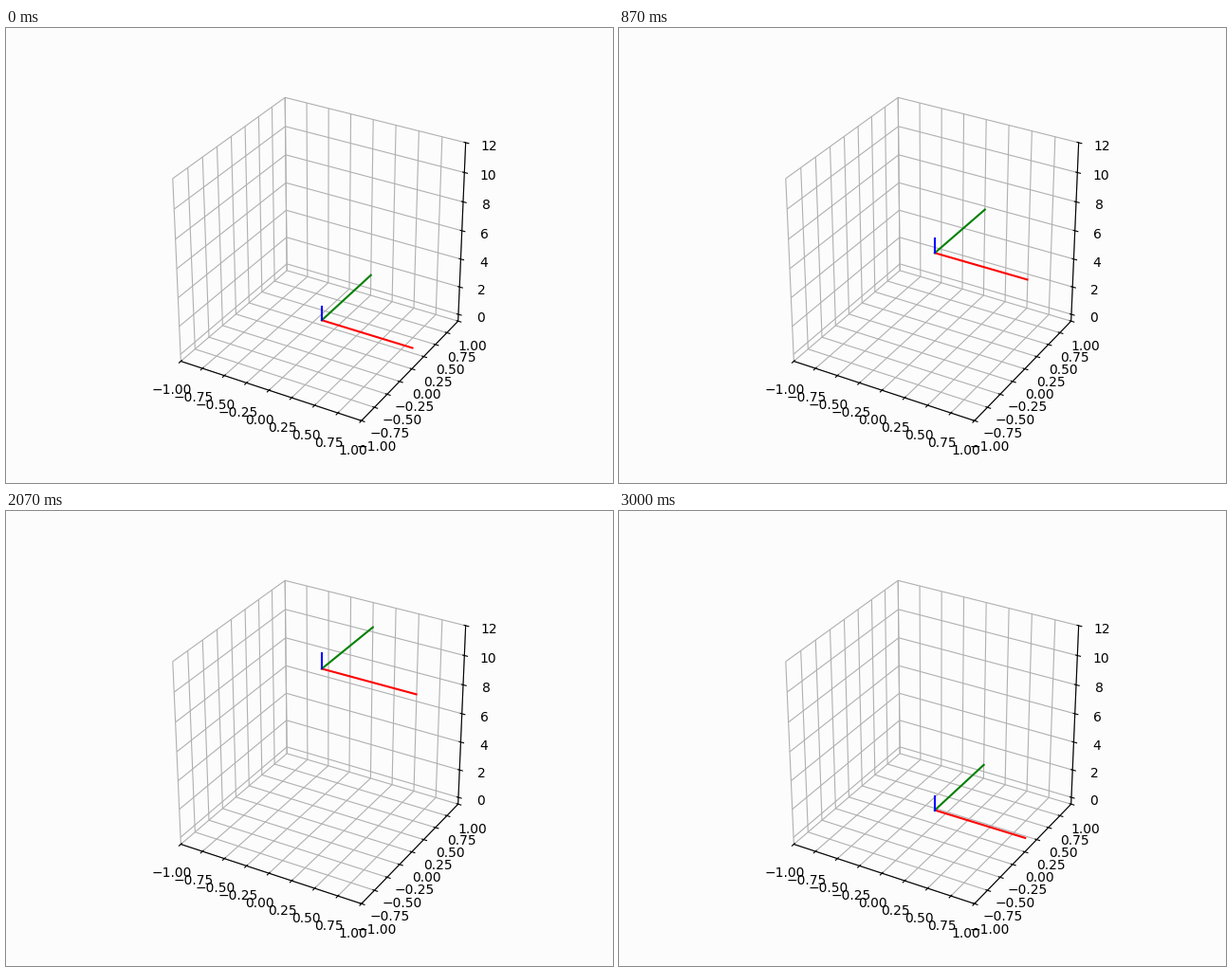
These frames come from a looping animation (640 px wide and 480 px high, 3030 ms). A matplotlib script:

```python
import matplotlib.pyplot as plt
import numpy as np
from matplotlib.animation import FuncAnimation

FRAMES = 101
INTERVAL = 30        # ms
ACC = 10.0           # thrust, then gravity
Z_START, Z_END = 1.0, 0.5
T_BURN = 1.0

Z_BURN = Z_START + ACC * T_BURN**2 / 2
V_BURN = ACC * T_BURN
Z_PEAK = Z_BURN + V_BURN**2 / (2 * ACC)
T_TOTAL = 2 * T_BURN + np.sqrt(2 * (Z_PEAK - Z_END) / ACC)


def height(t):
    """Constant push upwards, then free flight."""
    if t < T_BURN:
        return Z_START + ACC * t**2 / 2
    s = t - T_BURN
    return Z_BURN + V_BURN * s - ACC * s**2 / 2


fig = plt.figure(figsize=(6.4, 4.8), dpi=100, facecolor="#fcfcfc")
ax = fig.add_subplot(projection="3d", facecolor="#fcfcfc")
ax.set_box_aspect((1, 1, 1))
ax.set(xlim=(-1, 1), ylim=(-1, 1), zlim=(-0.5, 12))
for axis in (ax.xaxis, ax.yaxis, ax.zaxis):
    axis.set_pane_color((1, 1, 1, 0))

triad = [ax.plot([0, 0], [0, 0], [0, 0], color=c)[0]
         for c in ("red", "green", "blue")]


def update(i):
    # the starting pose is held for two frames
    t = max(i - 1, 0) / (FRAMES - 2) * T_TOTAL
    origin = np.array([0, 0, height(t)])
    for line, unit in zip(triad, np.eye(3)):
        line.set_data_3d(*np.column_stack([origin, origin + unit]))
    return triad


anim = FuncAnimation(fig, update, frames=FRAMES, interval=INTERVAL,
                     repeat=True, repeat_delay=0, blit=False)
plt.show()
```
